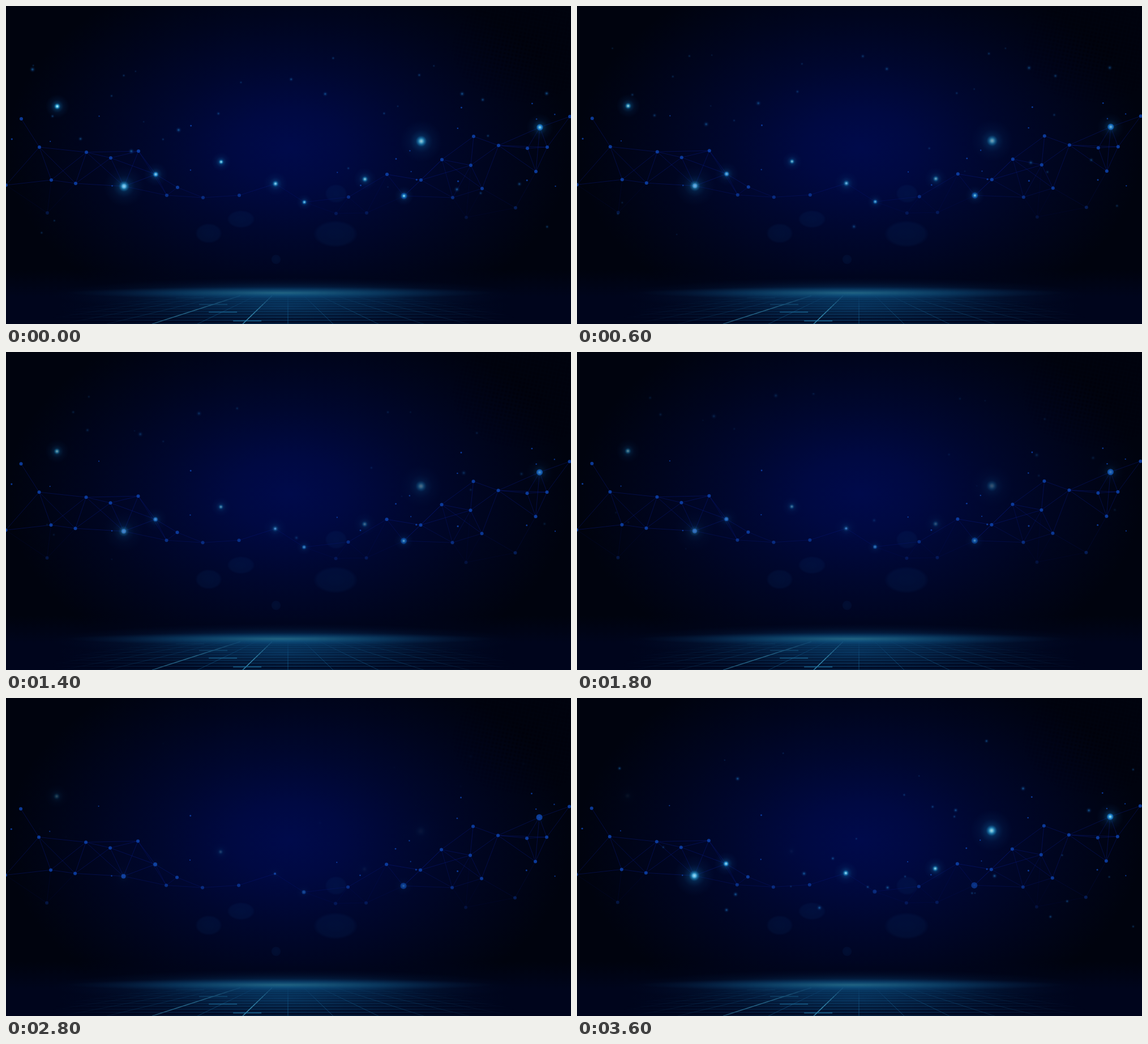
An HTML page that plays this animation: 998x561 px, repeating every 3.8 s.

```html
<!DOCTYPE html>
<html lang="en">
<head>
<meta charset="utf-8">
<title>Night network</title>
<style>
html, body { margin: 0; width: 100%; height: 100%; overflow: hidden; background: #00030e; }
svg { display: block; width: 100%; height: 100%; }
</style>
</head>
<body>
<svg viewBox="0 0 998 561" preserveAspectRatio="none">
  <defs>
    <radialGradient id="sky" gradientUnits="userSpaceOnUse" cx="0" cy="0" r="1" gradientTransform="translate(500 250) scale(500 330)">
      <stop offset="0" stop-color="#000a4b"/>
      <stop offset=".2" stop-color="#000942"/>
      <stop offset=".45" stop-color="#00072f"/>
      <stop offset=".7" stop-color="#00051f"/>
      <stop offset="1" stop-color="#00030e"/>
    </radialGradient>
    <linearGradient id="ground" x1="0" y1="0" x2="0" y2="1">
      <stop offset="0" stop-color="#00051c" stop-opacity="0"/>
      <stop offset=".5" stop-color="#00051c"/>
      <stop offset="1" stop-color="#00051c"/>
    </linearGradient>
    <radialGradient id="haze">
      <stop offset="0" stop-color="#0d5a90" stop-opacity=".8"/>
      <stop offset=".35" stop-color="#0a4a7c" stop-opacity=".5"/>
      <stop offset=".7" stop-color="#063260" stop-opacity=".18"/>
      <stop offset="1" stop-color="#042050" stop-opacity="0"/>
    </radialGradient>
    <radialGradient id="rim">
      <stop offset="0" stop-color="#36869a" stop-opacity=".55"/>
      <stop offset=".5" stop-color="#136493" stop-opacity=".3"/>
      <stop offset="1" stop-color="#0a4078" stop-opacity="0"/>
    </radialGradient>
    <radialGradient id="fade" gradientUnits="userSpaceOnUse" cx="0" cy="0" r="1" gradientTransform="translate(490 552) scale(410 46)">
      <stop offset="0" stop-color="#fff"/>
      <stop offset=".4" stop-color="#aaa"/>
      <stop offset=".75" stop-color="#444"/>
      <stop offset="1" stop-color="#000"/>
    </radialGradient>
    <mask id="floorMask" maskUnits="userSpaceOnUse" x="0" y="490" width="998" height="71">
      <rect y="490" width="998" height="71" fill="url(#fade)"/>
    </mask>
    <radialGradient id="flare">
      <stop offset="0" stop-color="#c8f6ff"/>
      <stop offset=".07" stop-color="#74d8f6"/>
      <stop offset=".16" stop-color="#1f96d0" stop-opacity=".8"/>
      <stop offset=".27" stop-color="#0f6aa6" stop-opacity=".38"/>
      <stop offset=".55" stop-color="#0a4a86" stop-opacity=".15"/>
      <stop offset="1" stop-color="#083a78" stop-opacity="0"/>
    </radialGradient>
    <radialGradient id="spark">
      <stop offset="0" stop-color="#2b8fd8"/>
      <stop offset=".28" stop-color="#1568b2" stop-opacity=".8"/>
      <stop offset=".55" stop-color="#0d4690" stop-opacity=".35"/>
      <stop offset="1" stop-color="#083878" stop-opacity="0"/>
    </radialGradient>
    <radialGradient id="disc">
      <stop offset="0" stop-color="#0b3a78"/>
      <stop offset=".8" stop-color="#0b3a78" stop-opacity=".8"/>
      <stop offset="1" stop-color="#0b3a78" stop-opacity="0"/>
    </radialGradient>
    <pattern id="dots" width="7" height="7" patternUnits="userSpaceOnUse" patternTransform="rotate(12)">
      <circle cx="3.5" cy="3.5" r="2" fill="#000006"/>
    </pattern>
    <radialGradient id="dotFade" cx=".65" cy=".4" r=".5">
      <stop offset="0" stop-color="#888"/>
      <stop offset="1" stop-color="#000"/>
    </radialGradient>
    <mask id="dotMask" maskUnits="userSpaceOnUse" x="750" y="0" width="248" height="190">
      <rect x="750" width="248" height="190" fill="url(#dotFade)"/>
    </mask>
    <clipPath id="band"><rect y="72" width="998" height="339"/></clipPath>
  </defs>
  <rect width="998" height="561" fill="url(#sky)"/>
  <rect x="750" width="248" height="190" fill="url(#dots)" mask="url(#dotMask)"/>
  <g fill="url(#disc)" opacity=".17">
    <ellipse cx="358" cy="401" rx="24" ry="18"/>
    <ellipse cx="415" cy="376" rx="25" ry="16"/>
    <ellipse cx="582" cy="402" rx="40" ry="24"/>
    <ellipse cx="583" cy="331" rx="20" ry="17"/>
    <ellipse cx="477" cy="447" rx="9" ry="9"/>
  </g>
  <rect y="465" width="998" height="96" fill="url(#ground)"/>
  <ellipse cx="490" cy="530" rx="400" ry="46" fill="url(#haze)" opacity=".6"/>
  <ellipse cx="490" cy="509" rx="410" ry="30" fill="url(#haze)" opacity=".8"/>
  <ellipse cx="485" cy="506" rx="380" ry="11" fill="url(#rim)"/>
  <g id="floor" mask="url(#floorMask)"></g>
  <g id="net"></g>
  <g id="flares"></g>
  <g id="sparks" clip-path="url(#band)"></g>
</svg>
<script>
const LOOP = 3800, STEP = 200, REBIRTH = 3000;
const $ = id => document.getElementById(id);
const clamp = v => Math.max(0, Math.min(1, v));

function add(parent, tag, attrs) {
  const el = document.createElementNS("http://www.w3.org/2000/svg", tag);
  for (const k in attrs) el.setAttribute(k, attrs[k]);
  return parent.appendChild(el);
}
const line = (parent, x1, y1, x2, y2, stroke, width, opacity) =>
  add(parent, "line", { x1, y1, x2, y2, stroke, "stroke-width": width, "stroke-opacity": opacity });

function seeded(seed) {
  return (lo, hi) => {
    seed = (seed * 16807) % 2147483647;
    return lo + (hi - lo) * seed / 2147483647;
  };
}

// Perspective floor with a few lit tiles
function buildFloor() {
  const floor = $("floor"), rnd = seeded(77), vx = 498, vy = 484;
  const rowY = i => 514 + i * 3.5 + i * i * .11;
  for (let k = -9; k <= 9; k++) {
    const lit = k === -1 || k === -3;
    line(floor, vx + k * 28, vy + 27, vx + k * 80, 561, lit ? "#4aaed2" : "#1f80b8", lit ? 1.5 : 1, lit ? .9 : .5);
  }
  for (let i = 0; i < 11; i++) {
    line(floor, 0, rowY(i), 998, rowY(i), "#1a74b0", 1, .5);
    if (i % 3) continue;
    const x = rnd(300, 620);
    line(floor, x, rowY(i) + 1, x + 50, rowY(i) + 1, "#2890c4", 2, .6);
  }
}

// Flares: position, glow radius, radius of the node beneath, birth
const flares = [
  { x: 90.5, y: 177, r: 21, birth: 0 },
  { x: 380, y: 275, r: 17, birth: 0 },
  { x: 527, y: 346, r: 14, node: 3.5, birth: 0 },
  { x: 703, y: 335, r: 17, node: 5.5, birth: 0 },
  { x: 208.5, y: 318, r: 36, node: 4, birth: REBIRTH },
  { x: 264.5, y: 297, r: 21, node: 3.5, birth: REBIRTH },
  { x: 476, y: 313.5, r: 21, node: 2, birth: REBIRTH },
  { x: 634, y: 305.5, r: 20, birth: REBIRTH },
  { x: 733.5, y: 238.5, r: 37, birth: REBIRTH },
  { x: 943, y: 214, r: 24, node: 5.5, birth: REBIRTH }
];

// Hubs dim towards the floor; close neighbours are linked
function buildNet() {
  const net = $("net"), rnd = seeded(41);
  const hubs = ("0,316 59,249 27,199 80,307 73,365 123,313 142,258 185,268 234,256 284,334 303,320 348,338 412,334 " +
    "583,366 637,365 605,337 673,297 733,307 770,271 821,281 826,230 870,246 921,251 956,249 996,195 936,292 " +
    "841,322 789,338 900,356 813,373").split(" ").map(p => p.split(",").map(Number));
  const nodes = [
    ...hubs.map(([x, y]) => ({ x, y, r: 3 })),
    ...flares.filter(f => f.node).map(f => ({ x: f.x, y: f.y, r: f.node }))
  ];
  const light = y => .2 + .65 * clamp((372 - y) / 55);
  nodes.forEach((a, i) => nodes.slice(i + 1).forEach(b => {
    const d = Math.hypot(a.x - b.x, a.y - b.y);
    if (d < 93) line(net, a.x, a.y, b.x, b.y, "#0d22a0", .8, .5 * Math.min(light(a.y), light(b.y)));
  }));
  for (let i = 0; i < 20; i++)
    nodes.push({ x: rnd(10, 990), y: rnd(170, 335), r: rnd(1, 1.6) });
  for (const n of nodes)
    add(net, "circle", { cx: n.x, cy: n.y, r: n.r, fill: "#0d43ac", opacity: light(n.y) });
}

// Sparks rise; nearer ones are larger, brighter and faster
function makeSparks(seed, count, from, to) {
  const rnd = seeded(seed);
  return Array.from({ length: count }, () => {
    const near = rnd(0, 1);
    return {
      from, to, x: rnd(20, 980), y: rnd(80, 440), vx: rnd(-30, 30), vy: -46 - 34 * near, glow: .3 + .45 * near,
      el: add($("sparks"), "circle", { r: 2.4 + 3.2 * near, fill: "url(#spark)" })
    };
  });
}

buildFloor();
buildNet();
for (const f of flares)
  f.el = add($("flares"), "circle", { cx: f.x, cy: f.y, r: f.r, fill: "url(#flare)" });
const sparks = [...makeSparks(2024, 34, 0, REBIRTH), ...makeSparks(519, 38, REBIRTH, LOOP)];

const left = (t, birth) => 1 - ((t - birth + LOOP) % LOOP) / LOOP;

function draw(now) {
  const t = Math.floor((now % LOOP) / STEP) * STEP;
  const drift = `translate(${-1.2 * t / 3600} ${-4.6 * t / 3600})`;
  $("net").setAttribute("transform", drift);
  $("flares").setAttribute("transform", drift);
  for (const f of flares)
    f.el.setAttribute("opacity", left(t, f.birth) * clamp(.35 + f.r / 32));
  for (const s of sparks) {
    const dt = (t - s.from) / 1000;
    s.el.setAttribute("cx", s.x + s.vx * dt);
    s.el.setAttribute("cy", s.y + s.vy * dt);
    s.el.setAttribute("opacity", t >= s.from && t < s.to ? s.glow * left(t, REBIRTH) : 0);
  }
}
function tick() {
  draw(performance.now());
  requestAnimationFrame(tick);
}
tick();
</script>
</body>
</html>
```
